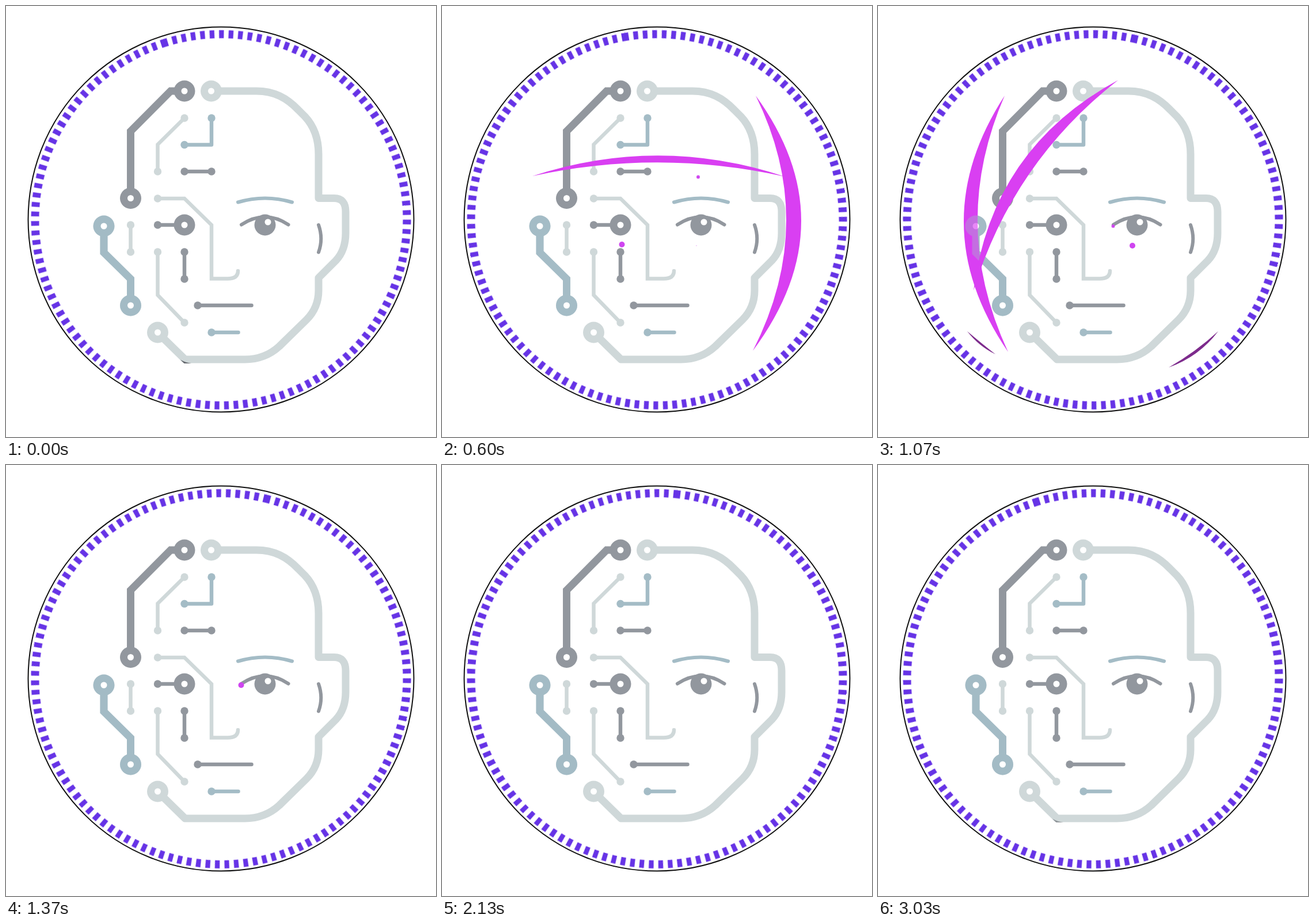
These frames come from a looping animation (747 by 750 pixels, 3060 ms). An HTML page:

```html
<!DOCTYPE html>
<html lang="en">
<head>
<meta charset="utf-8">
<title>Face scan</title>
<style>
  html, body { margin: 0; width: 100%; height: 100%; overflow: hidden; background: #fff; }
  svg { display: block; width: 747px; height: 750px; }

  .line { fill: none; stroke: currentColor; stroke-width: 6.5; stroke-linecap: round; stroke-linejoin: miter; }
  .thick { stroke-width: 13; stroke-linecap: butt; }
  .pad { fill: currentColor; }
  .hole { fill: #fff; }
  .dark { color: #92979e; }
  .pale { color: #cfd8d9; }
  .blue { color: #a4bcc6; }

  .ring, .beam, .spot, .trace, .chin { animation: 3060ms linear infinite; }

  .ring {
    fill: none; stroke: #6633e6; stroke-width: 14; stroke-dasharray: 8.23 8.23;
    transform-origin: 373.5px 372px;
    animation-name: swing;
  }
  @keyframes swing {
    0% { transform: rotate(-108.1deg); animation-timing-function: cubic-bezier(.777, 0, .236, 1); }
    45.75%, 50% { transform: rotate(-76.1deg); animation-timing-function: cubic-bezier(.688, 0, .235, 1); }
    100% { transform: rotate(-108.1deg); }
  }

  .beam { fill: #d93ff2; animation-timing-function: ease-in-out; }
  .side { animation-name: side; }
  .level { animation-name: level; }
  @keyframes side {
    0%, 9.8% { d: path("M220 156Q123 380 226 602Q123 380 220 156"); }
    19.608% { d: path("M545 156Q705.5 377 540 600Q653.5 377 545 156"); }
    34.967% { d: path("M220 156Q75 380 226 602Q123 380 220 156"); }
    41%, 100% { d: path("M220 156Q123 380 226 602Q123 380 220 156"); }
  }
  @keyframes level {
    0%, 7% { d: path("M155 566Q373 720 591 566Q373 720 155 566"); }
    19.608% { d: path("M157 296Q376.5 224 596 297Q376.5 248 157 296"); }
    34.967% { d: path("M166 495Q197.6 247.6 417 129Q233.8 272.4 166 495"); }
    42%, 100% { d: path("M215 500Q180 280 310 125Q180 280 215 500"); }
  }

  .trace { fill: #7d2b8c; opacity: 0; animation-name: trace; }
  @keyframes trace {
    0%, 33% { opacity: 0; }
    34.5%, 36% { opacity: 1; }
    37.5%, 100% { opacity: 0; }
  }

  .chin { fill: #666a70; animation-name: chin; }
  @keyframes chin {
    0%, 1% { opacity: 1; }
    3%, 97.5% { opacity: 0; }
    99%, 100% { opacity: .6; }
  }

  .spot {
    fill: #cf45f0; transform: scale(0);
    transform-box: fill-box; transform-origin: center;
    animation-name: pop;
  }
  @keyframes pop {
    0% { transform: scale(0); }
    4%, 18% { transform: scale(1); }
    22%, 100% { transform: scale(0); }
  }
</style>
</head>
<body>
<svg viewBox="0 0 747 750">
  <circle cx="373.5" cy="371.5" r="335" fill="none" stroke="#111" stroke-width="2"/>
  <circle class="ring" cx="373.5" cy="372" r="323"/>

  <g class="pale">
    <path class="line thick" style="stroke-linejoin:round" d="M356 148H435C466 148 488 160 508 181L519 192C535 209 543 230 543 258V334.5H570Q590 334.5 590 358V395Q590 425 573 443L543 473V495Q543 525 522 546L475 592Q450 615 415 615H311L263 568"/>
    <path class="line" d="M310 195L263.500 241V288M263 335H310L357 381V474.500H385Q403 474.500 403 461M216.500 381V428M263.500 428V503L310 551"/>
  </g>
  <path class="chin" d="M303 615.500L309.500 622H322Q312 620.500 303 615.500"/>
  <g class="dark">
    <path class="line thick" d="M310 148H286L216.500 218V334"/>
    <path class="line" d="M310 288H357M263 381H310M310 428V475M333 521H426.500"/>
    <path class="line" style="stroke-width:6" d="M409 380.500Q450 353.500 490.500 380.500M543 381Q551.500 405 543 428.500"/>
  </g>
  <g class="blue">
    <path class="line" style="stroke-linejoin:round" d="M357 195V241.500H310M357 568H403.500"/>
    <path class="line" style="stroke-width:6" d="M403 341.500Q450 327.500 497 341.500"/>
  </g>
  <g id="jaw" class="blue">
    <path class="line thick" d="M170 383V429L216.500 475V521"/>
    <g id="jawPads"></g>
  </g>
  <g id="pads"></g>
  <circle class="pad dark" cx="450" cy="381" r="18.5"/>
  <circle class="hole" cx="455" cy="376" r="5.5"/>

  <path class="trace" d="M155 566Q175 592 204 606Q181 588 155 566M505 629Q558 610 591 566Q552 602 505 629"/>
  <path class="beam side"/>
  <!-- the jaw wire shines through the side beam -->
  <use href="#jaw" opacity=".38"/>
  <path class="beam level"/>

  <circle class="spot" cx="445" cy="297.500" r="5"/>
  <circle class="spot" cx="312.500" cy="415" r="5" style="animation-delay:300ms"/>
  <circle class="spot" cx="442" cy="417" r="5" style="animation-delay:588ms"/>
  <circle class="spot" cx="408.500" cy="383" r="5" style="animation-delay:1000ms"/>
</svg>
<script>
  const circle = (cls, x, y, r) => `<circle class="${cls}" cx="${x}" cy="${y}" r="${r}"/>`;
  const dot = tone => ([x, y]) => circle("pad " + tone, x, y, 6.7);
  const hub = tone => ([x, y]) => circle("pad " + tone, x, y, 18.5) + circle("hole", x, y, 5.5);
  const ends = {
    pale: [[310, 195], [263.5, 288], [263.5, 335], [216.5, 381], [216.5, 428], [263.5, 428], [310, 551]],
    dark: [[310, 288], [357, 288], [263.5, 381], [310, 428], [310, 475], [333, 521]],
    blue: [[357, 195], [310, 241.5], [357, 568]]
  };
  const hubs = {
    pale: [[356.5, 148], [263.5, 568]],
    dark: [[310, 148], [216.5, 334.5], [310, 381]]
  };
  const draw = (groups, shape) =>
    Object.entries(groups).map(([tone, spots]) => spots.map(shape(tone)).join("")).join("");

  document.getElementById("pads").innerHTML = draw(ends, dot) + draw(hubs, hub);
  document.getElementById("jawPads").innerHTML = draw({ blue: [[170, 383], [216.5, 521]] }, hub);
</script>
</body>
</html>
```
